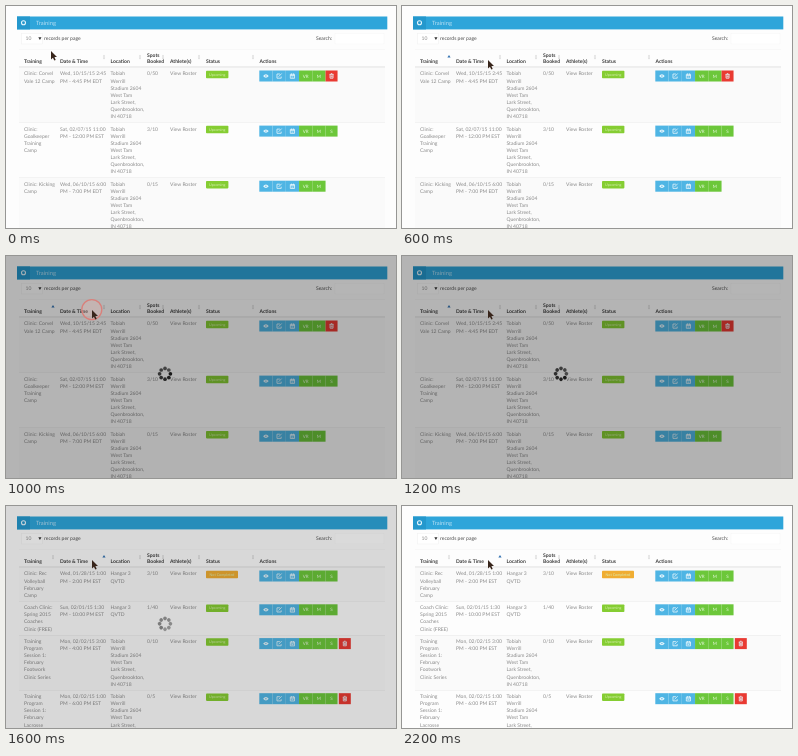
Animation, 390 px wide and 222 px high, one loop 2300 ms. Source, as an HTML page:

```html
<!DOCTYPE html>
<html lang="en">
<head>
<meta charset="utf-8">
<title>Sorting a training table</title>
<style>
  html, body { margin: 0; width: 100%; height: 100%; overflow: hidden; background: #fdfdfd; }
  svg { display: block; width: 390px; height: 222px; }
  text { font: 5.04px Lato, "Open Sans", sans-serif; fill: #8a8a8a; text-rendering: geometricPrecision; }
  .head { font-weight: 700; fill: #3c3c3c; }
  .form { fill: #4a4a4a; }
  .title { font-size: 5.8px; fill: #b9e0f4; }
  .label { font-size: 3.7px; fill: #d9efb4; text-anchor: middle; }
  .button { font-size: 4.5px; fill: #e9f8e0; text-anchor: middle; }
  .icon { fill: none; stroke: #e6f5fc; stroke-width: .8; }
</style>
</head>
<body>
<svg viewBox="0 0 390 222">
  <g id="page"></g>
  <g id="before"></g>
  <g id="after"></g>
  <rect id="shade" width="390" height="222"/>
  <g id="spinner"></g>
  <circle id="ring" cx="85.8" cy="53.6" fill="#f3b5ad" fill-opacity=".25" stroke="#d9807b" stroke-width="1.3"/>
  <path id="cursor" d="M0 0V8.4L1.9 6.7L3.3 9.6L4.7 9L3.4 6.1H6Z" fill="#38251b"/>
</svg>
<script>
const LOOP = 2300, STEP = 100;
const LINE = 7.1, ROW_PAD = 5.4, TABLE_TOP = 61.4;
const BUTTON = 13.25, BUTTON_HEIGHT = 11;
const COLUMNS = { name: 18, date: 54, place: 104.5, spots: 141, athletes: 164, status: 200, actions: 253.3 };
const BLUE = '#4fb5e4', GREEN = '#6cc73a', RED = '#e93a32';
const $ = id => document.getElementById(id);

const rect = (x, y, w, h, fill, extra = '') =>
  `<rect x="${x}" y="${y}" width="${w}" height="${h}" fill="${fill}" ${extra}/>`;
const text = (x, y, value, cls = '') => `<text x="${x}" y="${y}" class="${cls}">${value}</text>`;
const lines = (x, y, value) => value.split('|').map((s, i) => text(x, y + i * LINE, s)).join('');

const ICONS = {
  eye: `<path d="M-2.8 0Q0-3.4 2.8 0Q0 3.4-2.8 0Z" fill="#e6f5fc"/><circle r=".7" fill="${BLUE}"/>`,
  edit: '<path class="icon" d="M.7-2H-2.2V2.2H2V.5M-.6.7L2.5-2.5"/>',
  calendar: '<path class="icon" d="M-2.1-1.7H2.1V2.3H-2.1ZM-2.1-.5H2.1M-1-2.6V-1M1-2.6V-1M-1 1H1"/>',
  trash: '<path class="icon" d="M-2-1.6H2M-.7-2.4H.7M-1.5-1.6V2.2H1.5V-1.6M-.4-.5V1.3M.5-.5V1.3"/>'
};

function button(kind, i, y) {
  const x = COLUMNS.actions + i * BUTTON;
  const w = i > 4 ? 12 : BUTTON;
  const fill = kind === 'trash' ? RED : ICONS[kind] ? BLUE : GREEN;
  const mark = ICONS[kind]
    ? `<g transform="translate(${x + w / 2} ${y + 5.5})">${ICONS[kind]}</g>`
    : text(x + w / 2, y + 7.1, kind, 'button');
  return rect(x, y, w, BUTTON_HEIGHT, fill) + mark;
}

function sortMark(x, active) {
  return active
    ? `<path d="M${x - 1.6} 51.5h3.2l-1.6-2.6Z" fill="#2f6fb0"/>`
    : `<path d="M${x - 1.2} 50.6h2.4l-1.2-1.9ZM${x - 1.2} 51.6h2.4l-1.2 1.9Z" fill="#d3d3d3"/>`;
}

function table(rows, sorted) {
  let top = TABLE_TOP;
  let out = [47, 98, 134, 157, 193, 247].map((x, i) => sortMark(x, i === sorted)).join('');
  rows.forEach((row, n) => {
    const base = top + 8;
    const count = Math.max(row.name.split('|').length, row.place.split('|').length);
    const height = count * LINE + ROW_PAD;
    const [label, width, color] = row.status;
    out += rect(13, top, 366, height, n % 2 ? '#fdfdfd' : '#fafafa');
    out += rect(13, top, 366, .4, '#e4e4e4');
    for (const key of ['name', 'date', 'place', 'spots']) out += lines(COLUMNS[key], base, row[key]);
    out += text(COLUMNS.athletes, base, 'View Roster');
    out += rect(COLUMNS.status, top + 3.3, width, 7.5, color, 'rx=".8"');
    out += text(COLUMNS.status + width / 2, top + 8.2, label, 'label');
    const kinds = ['eye', 'edit', 'calendar', 'VR', 'M', ...row.extra];
    out += kinds.map((kind, i) => button(kind, i, top + 3.1)).join('');
    top += height;
  });
  return out;
}

const STADIUM = 'Tobiah|Werrill|Stadium 2604|West Tam|Lark Street,|Quenbrookton,|IN 40718';
const HALL = 'Hangar 3|QVTD';
const UPCOMING = ['Upcoming', 22.4, '#85cd32'];
const INCOMPLETE = ['Not Completed', 32, '#f0ad32'];
const session = (name, date, place, spots, extra, status = UPCOMING) =>
  ({ name, date, place, spots, extra, status });

$('before').innerHTML = table([
  session('Clinic: Corvel|Vale 12 Camp', 'Wed, 10/15/15 2:45|PM - 4:45 PM EDT', STADIUM, '0/50', ['trash']),
  session('Clinic:|Goalkeeper|Training|Camp', 'Sat, 02/07/15 11:00|PM - 12:00 PM EST', STADIUM, '3/10', ['S']),
  session('Clinic: Kicking|Camp', 'Wed, 06/10/15 6:00|PM - 7:00 PM EDT', STADIUM, '0/15', [])
], 0);

$('after').innerHTML = table([
  session('Clinic: Rec|Volleyball|February|Camp', 'Wed, 01/28/15 1:00|PM - 2:00 PM EST', HALL, '3/10', ['S'], INCOMPLETE),
  session('Coach Clinic:|Spring 2015|Coaches|Clinic (FREE)', 'Sun, 02/01/15 1:30|PM - 10:00 PM EST', HALL, '1/40', ['S']),
  session('Training|Program|Session 1:|February|Footwork|Clinic Series', 'Mon, 02/02/15 3:00|PM - 4:00 PM EST', STADIUM, '0/10', ['S', 'trash']),
  session('Training|Program|Session 1:|February|Lacrosse|Clinic Series', 'Mon, 02/02/15 1:00|PM - 6:00 PM EST', STADIUM, '0/5', ['S', 'trash'])
], 1);

$('page').innerHTML =
  rect(0, 0, 390, 222, '#fdfdfd') +
  rect(11, 10.5, 370.3, 12.9, '#2ea5da') +
  rect(11, 10.5, 13, 12.9, '#2498cd') +
  '<circle cx="17.5" cy="16.7" r="2" fill="none" stroke="#e6f6fd" stroke-width="1.1"/>' +
  text(30, 18.8, 'Training', 'title') +
  rect(15.5, 27.2, 21, 10.8, '#fff', 'stroke="#ececec" stroke-width=".4"') +
  text(19.5, 34.4, '10') +
  '<path d="M32.3 31.3h3.2l-1.6 2.6Z" fill="#333"/>' +
  text(38, 34.2, 'records per page', 'form') +
  text(310, 34.2, 'Search:', 'form') +
  rect(329, 27.2, 49, 10.8, '#fff', 'stroke="#f2f2f2" stroke-width=".4"') +
  rect(13, 43, 366, .4, '#f0f0f0') +
  text(141, 50.6, 'Spots', 'head') +
  [[18, 'Training'], [54, 'Date &amp; Time'], [104.5, 'Location'], [141, 'Booked'],
   [164, 'Athlete(s)'], [200, 'Status'], [253.5, 'Actions']]
    .map(([x, s]) => text(x, 57.3, s, 'head')).join('') +
  rect(13, 60.6, 366, .7, '#d8d8d8');

$('spinner').innerHTML = Array.from({ length: 8 }, (_, i) => {
  const a = i * Math.PI / 4, level = 25 + i * 7;
  return `<circle cx="${159 + 5.4 * Math.cos(a)}" cy="${117.8 + 5.4 * Math.sin(a)}" r="1.85"
    fill="rgb(${level},${level},${level})"/>`;
}).join('');

const clamp = v => Math.max(0, Math.min(1, v));

function draw(time) {
  const t = Math.floor(time % LOOP / STEP) * STEP;
  const move = 1 - (1 - clamp(t / 600)) ** 1.4;
  $('cursor').setAttribute('transform', `translate(${45 + 41 * move} ${45 + 9 * move})`);

  const clicked = t >= 800 && t < 1200;
  $('ring').setAttribute('r', clicked ? 6 + 4 * clamp((t - 800) / 100) : 0);
  $('ring').setAttribute('opacity', clicked ? 1 - .6 * clamp((t - 1000) / 100) : 0);

  const reloaded = t >= 1600;
  $('before').setAttribute('display', reloaded ? 'none' : 'inline');
  $('after').setAttribute('display', reloaded ? 'inline' : 'none');

  const block = t < 1000 ? 0 : clamp((1700 - t) / 200);
  $('shade').setAttribute('opacity', .29 * block);
  $('spinner').setAttribute('opacity', block);
  $('spinner').setAttribute('transform', `rotate(${(t - 1000) * 360 / 1600} 159 117.8)`);
}

const start = performance.now();
function tick() {
  draw(performance.now() - start);
  requestAnimationFrame(tick);
}
draw(0);
requestAnimationFrame(tick);
</script>
</body>
</html>
```
